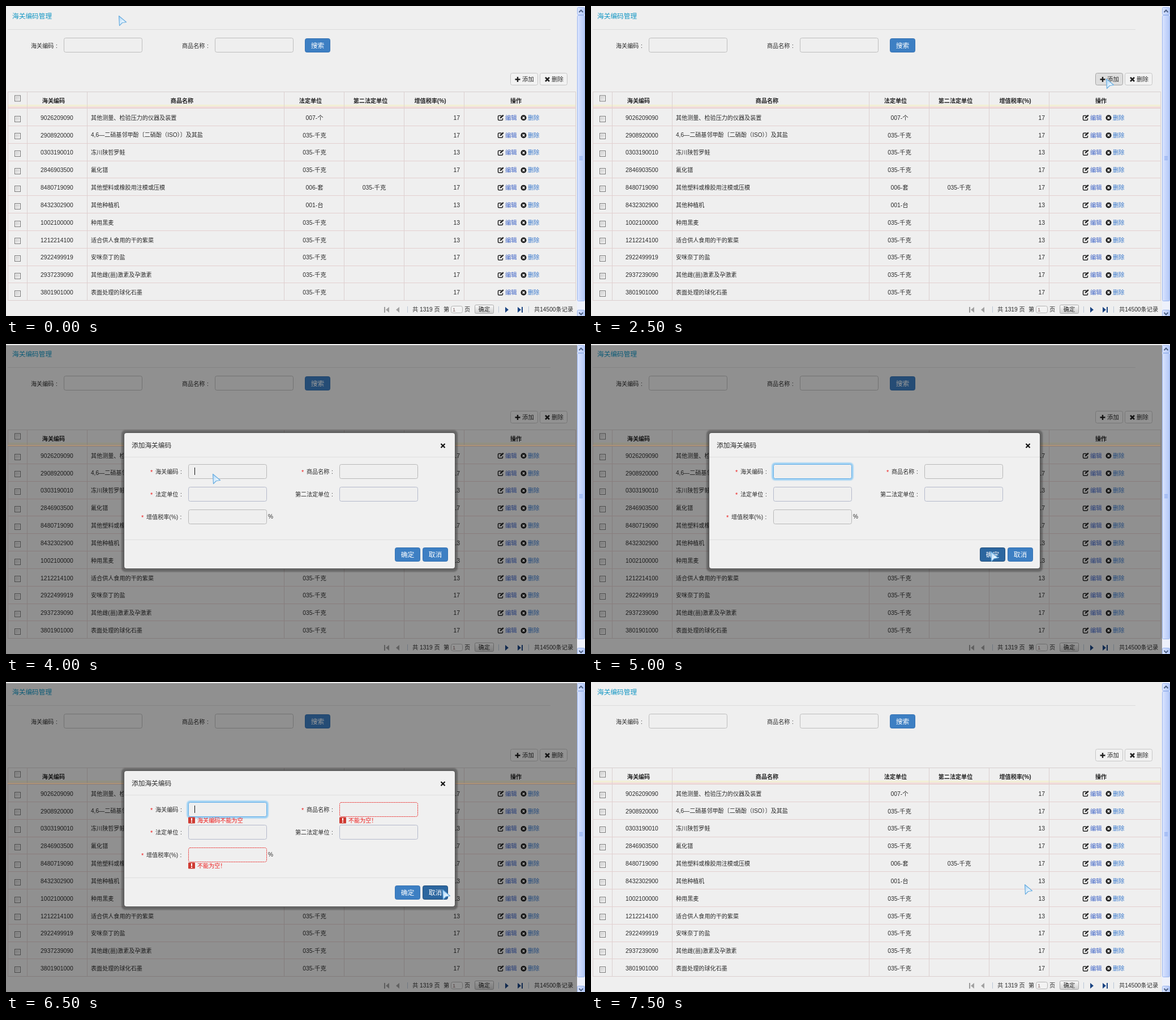
These frames come from a looping animation (1023x547 px, 8 s). An HTML page:

```html
<!DOCTYPE html>
<html lang="zh-CN">
<head>
<meta charset="utf-8">
<title>海关编码管理</title>
<style>
html, body { margin: 0; width: 100%; height: 100%; overflow: hidden; background: #efefef; }
svg { display: block; width: 1023px; height: 547px; }
text { font-family: "Liberation Sans", "Noto Sans CJK SC", "Noto Sans CJK", sans-serif; white-space: pre; }
</style>
</head>
<body>
<svg id="stage" viewBox="0 0 1023 547">
  <defs>
    <linearGradient id="thumb"><stop stop-color="#dce6ff"/><stop offset=".5" stop-color="#c6d5fb"/><stop offset="1" stop-color="#b3c8f6"/></linearGradient>
    <linearGradient id="grey" x2="0" y2="1"><stop stop-color="#fafafa"/><stop offset="1" stop-color="#cfcfcf"/></linearGradient>
    <linearGradient id="check" x2="1" y2="1"><stop stop-color="#cfcfcf"/><stop offset="1" stop-color="#ececec"/></linearGradient>
    <linearGradient id="arrow" x2="1" y2="1"><stop stop-color="#a9d2f5"/><stop offset=".55" stop-color="#e2f2fe"/><stop offset="1" stop-color="#ffffff"/></linearGradient>
    <filter id="soft" x="-10%" y="-10%" width="120%" height="120%"><feGaussianBlur stdDeviation="1.3"/></filter>
  </defs>
</svg>
<script>
const NS = 'http://www.w3.org/2000/svg';
const stage = document.getElementById('stage');
const BLUE = '#3d7fc3', INK = '#2b2b2b', RED = '#ee1c1c', PAPER = '#efefef';

function add(parent, tag, attrs) {
  const el = document.createElementNS(NS, tag);
  for (const key in attrs) el.setAttribute(key, attrs[key]);
  return parent.appendChild(el);
}
const group = parent => add(parent, 'g', {});
const rect = (g, x, y, width, height, fill, more) => add(g, 'rect', { x, y, width, height, fill, ...more });
const path = (g, d, more) => add(g, 'path', { d, ...more });
const line = (g, x1, y1, x2, y2, stroke) => add(g, 'line', { x1, y1, x2, y2, stroke });

// y is the vertical middle of the glyphs
function text(g, str, x, y, more = {}) {
  const size = more['font-size'] || 10.1;
  const el = add(g, 'text', { x, y: y + size * 0.36, fill: INK, 'font-size': size, ...more });
  el.textContent = str;
  return el;
}
function label(g, str, x, y, required) {
  if (required) text(g, '*', x - 9, y + 1, { fill: RED, 'font-size': 11 });
  add(text(g, str, x, y), 'tspan', { dx: 3.5 }).textContent = ':';
}
function box(g, x, y, w, h, fill, stroke, more) {
  return rect(g, x + .5, y + .5, w - 1, h - 1, fill, { stroke, rx: 3, ...more });
}
function blueButton(g, str, x, y) {
  const b = box(g, x, y, 45, 25, BLUE, '#3572b3');
  text(g, str, x + 22.5, y + 12.5, { fill: '#fff', 'font-size': 11.8, 'text-anchor': 'middle' });
  return b;
}

const page = group(stage);
rect(page, 0, 0, 1023, 547, PAPER);

function drawSearch(g) {
  text(g, '海关编码管理', 11, 18, { fill: '#1497c4', 'font-size': 11.7 });
  line(g, 3, 41.5, 962, 41.5, '#dcdcdc');
  label(g, '海关编码', 44, 70);
  label(g, '商品名称', 311, 70);
  box(g, 102, 56, 139, 26, PAPER, '#bdbdbd');
  box(g, 369, 56, 139, 26, PAPER, '#bdbdbd');
  blueButton(g, '搜索', 528, 57);
}

function drawTools(g) {
  const addBox = box(g, 891, 118, 49, 22, '#f2f2f2', '#c6c6c6');
  path(g, 'M899.5 129.5h9M904 125v9', { stroke: '#222', 'stroke-width': 2.4 });
  text(g, '添加', 912, 129.5, { 'font-size': 10.4 });
  box(g, 943, 118, 49, 22, '#f2f2f2', '#c6c6c6');
  path(g, 'M953 126l7 7M960 126l-7 7', { stroke: '#222', 'stroke-width': 2.6 });
  text(g, '删除', 964, 129.5, { 'font-size': 10.4 });
  return addBox;
}

const COLUMNS = [3, 37, 143, 491, 597, 703, 809, 1006];
const HEADS = [['海关编码', 84], ['商品名称', 311], ['法定单位', 538], ['第二法定单位', 644], ['增值税率(%)', 749.5], ['操作', 901]];
const KG = '035-千克', PITCH = 30.84;
const ROWS = [
  ['9026209090', '其他测量、检验压力的仪器及装置', '007-个', 17],
  ['2908920000', '4,6—二硝基邻甲酚〔二硝酚（ISO）〕及其盐', KG, 17],
  ['0303190010', '冻川陕哲罗鲑', KG, 13],
  ['2846903500', '氟化镨', KG, 17],
  ['8480719090', '其他塑料或橡胶用注模或压模', '006-套', 17, KG],
  ['8432302900', '其他种植机', '001-台', 13],
  ['1002100000', '种用黑麦', KG, 13],
  ['1212214100', '适合供人食用的干的紫菜', KG, 13],
  ['2922499919', '安咪奈丁的盐', KG, 17],
  ['2937239090', '其他雌(甾)激素及孕激素', KG, 17],
  ['3801901000', '表面处理的球化石墨', KG, 17]
];

function checkbox(g, y) {
  rect(g, 15.5, y - 5, 10, 10, '#f6f6f6', { stroke: '#777' });
  rect(g, 17, y - 3.5, 7, 7, 'url(#check)');
}

function drawTable(g) {
  rect(g, 3, 174, 1003, 3.5, '#f2efd6');
  rect(g, 3, 177.5, 1003, 3, '#f2dada');
  line(g, 3, 151.5, 1006, 151.5, '#d6cfcf');
  for (const x of COLUMNS) line(g, x + .5, 151, x + .5, 520, '#dbd0d0');
  checkbox(g, 163);
  for (const [str, x] of HEADS) text(g, str, x, 167, { 'font-weight': 'bold', 'text-anchor': 'middle', fill: '#222' });
  ROWS.forEach(([code, name, unit, rate, unit2], i) => {
    const y = 197 + i * PITCH, edge = Math.round(180 + i * PITCH) + .5;
    const mid = { 'text-anchor': 'middle', 'font-size': 10.4 };
    line(g, 3, edge, 1006, edge, '#e3cfcf');
    checkbox(g, Math.round(y + 1.5) + .5);
    text(g, code, 90, y, mid);
    text(g, name, 150, y);
    text(g, unit, 545, y, mid);
    if (unit2) text(g, unit2, 650.5, y, mid);
    text(g, rate, 802, y, { 'text-anchor': 'end', 'font-size': 10.4 });
    const ops = add(g, 'g', { transform: `translate(0 ${y})` });
    path(ops, 'M875.5 -3.5h-4.5q-1.500 0 -1.500 1.500v5q0 1.500 1.500 1.500h5q1.500 0 1.500 -1.500v-2', { fill: 'none', stroke: '#222', 'stroke-width': 1.5 });
    path(ops, 'M872.500 1.500l.7 -2.500l4.800 -4.300l1.600 1.700l-4.700 4.500z', { fill: '#222' });
    text(ops, '编辑', 882, 0, { fill: '#3c62c6', 'font-size': 10.3 });
    add(ops, 'circle', { cx: 914.5, cy: .3, r: 5, fill: '#222' });
    path(ops, 'M912.700 -1.500l3.600 3.600M916.300 -1.500l-3.600 3.600', { stroke: '#fff', 'stroke-width': 1.5 });
    text(ops, '删除', 922, 0, { fill: '#3677cc', 'font-size': 10.3 });
  });
  line(g, 3, 519.5, 1006, 519.5, '#dccfcf');
}

function drawPager(g) {
  const y = 535.5, t = { 'font-size': 10.2 };
  rect(g, 668, 531, 2, 10, '#9b9b9b');
  path(g, 'M677 531v10l-6 -5zM695 531v10l-6 -5z', { fill: '#a2a2a2' });
  path(g, 'M882 531v10l6 -5zM904 531v10l6 -5zM911 531h2v10h-2z', { fill: '#1c4583' });
  for (const x of [709.5, 870.5, 923.5]) line(g, x, 530, x, 541, '#b9c6d6');
  text(g, '共 1319 页', 718, y, t);
  text(g, '第', 773, y, t);
  box(g, 786, 529, 21, 13, '#f3f3f3', '#b5b5b5');
  text(g, '1', 789, y, { fill: '#866', 'font-size': 9.5 });
  text(g, '页', 810, y, t);
  box(g, 828, 527, 34, 16, 'url(#grey)', '#aaa', { rx: 2 });
  text(g, '确定', 845, y, { ...t, 'text-anchor': 'middle' });
  text(g, '共14500条记录', 933, y, t);
}

function drawScrollbar(g) {
  const edge = '#9db7ee';
  rect(g, 1009, 0, 14, 547, '#eef1fb');
  box(g, 1009, 2, 14, 14, 'url(#thumb)', edge, { rx: 2 });
  box(g, 1009, 16, 14, 505, 'url(#thumb)', edge, { rx: 2 });
  box(g, 1009, 536, 14, 15, 'url(#thumb)', edge, { rx: 2 });
  path(g, 'M1012.500 11l3.500 -3.500l3.500 3.500M1012.500 541l3.500 3.500l3.500 -3.500', { fill: 'none', stroke: '#4d6185', 'stroke-width': 2 });
  for (let y = 265; y < 272; y += 2) line(g, 1013, y + .5, 1019, y + .5, '#8caaf0');
}

const FIELD_TOPS = [212, 252, 292];
function field(g, x, row) {
  return box(g, x, FIELD_TOPS[row], 139, 26, PAPER, row === 1 ? '#b4b9cb' : '#b8b8b8');
}
function errorNote(g, str, x, y) {
  rect(g, x, y - 5.5, 12, 11, '#cf3a32', { rx: 1 });
  rect(g, x + 5, y - 4, 2, 5, '#fff');
  rect(g, x + 5, y + 2, 2, 2, '#fff');
  text(g, str, x + 16, y, { fill: RED });
}

function drawDialog(g) {
  rect(g, 0, 2, 1009, 545, '#000', { opacity: .4 });
  line(g, 3, 179, 1006, 179, '#c8a56c');
  rect(g, 204, 152, 594, 250, '#000', { rx: 7, opacity: .28, filter: 'url(#soft)' });
  rect(g, 208, 156, 586, 241, '#555', { rx: 5 });
  rect(g, 209, 157, 584, 239, '#f0f0f0', { rx: 4 });
  text(g, '添加海关编码', 222, 179, { 'font-size': 11.7 });
  path(g, 'M768.500 176l7 7M775.500 176l-7 7', { stroke: '#111', 'stroke-width': 2.2 });
  line(g, 209, 199.5, 793, 199.5, '#dedede');
  line(g, 209, 345.5, 793, 345.5, '#dedede');
  label(g, '海关编码', 264, 225, true);
  label(g, '商品名称', 531, 225, true);
  label(g, '法定单位', 264, 265, true);
  label(g, '第二法定单位', 511, 265);
  label(g, '增值税率(%)', 248, 305, true);
  text(g, '%', 463, 304.5);
  const glow = rect(g, 321, 211, 141, 28, 'none', { stroke: '#7cc4f5', 'stroke-width': 2.5, rx: 4, filter: 'url(#soft)' });
  const code = field(g, 322, 0), name = field(g, 589, 0);
  field(g, 322, 1);
  field(g, 589, 1);
  const rate = field(g, 322, 2);
  const caret = rect(g, 333, 218, 1, 13, '#111');
  const errors = group(g);
  errorNote(errors, '海关编码不能为空', 322, 244);
  errorNote(errors, '不能为空！', 589, 244);
  errorNote(errors, '不能为空！', 322, 324);
  const ok = blueButton(g, '确定', 687, 359), cancel = blueButton(g, '取消', 736, 359);
  return { glow, code, name, rate, caret, errors, ok, cancel };
}

drawSearch(page);
const addBox = drawTools(page);
drawTable(page);
drawPager(page);
drawScrollbar(page);
const dialog = group(stage);
const ui = drawDialog(dialog);
const cursor = group(stage);
path(cursor, 'M.5 .5L13.500 11.500L6.500 12.500L1.500 17.500Z', { fill: 'url(#arrow)', stroke: '#69addf', 'stroke-width': 1.2, 'stroke-linejoin': 'round' });

// One entry per half second: pointer position, and the parts lit at that time
const STEP = 500;
const STEPS = [
  [199, 17, ''], [462, 60, ''], [573, 69, ''], [813, 136, ''], [813, 136, ''],
  [910, 128, 'add'], [910, 128, 'add open'], [581, 246, 'add open'],
  [365, 229, 'open caret'], [692, 341, 'open caret focus'], [706, 366, 'open focus ok'],
  [605, 319, 'open caret focus errors'], [470, 262, 'open focus errors'],
  [771, 366, 'open caret focus errors cancel'], [768, 366, 'open focus errors cancel'],
  [766, 357, '']
];

const show = (el, on) => { el.style.display = on ? '' : 'none'; };
function paint(el, fill, stroke, dash = 'none') {
  el.setAttribute('fill', fill);
  el.setAttribute('stroke', stroke);
  el.setAttribute('stroke-dasharray', dash);
}
const paintButton = (el, hot) => hot ? paint(el, '#2c669f', '#204d7a') : paint(el, BLUE, '#3572b3');

function render(time) {
  const [x, y, parts] = STEPS[Math.floor(time / STEP) % STEPS.length];
  const has = part => parts.split(' ').includes(part);
  cursor.setAttribute('transform', `translate(${x} ${y})`);
  has('add') ? paint(addBox, '#dedede', '#a3a3a3') : paint(addBox, '#f2f2f2', '#c6c6c6');
  show(dialog, has('open'));
  show(ui.caret, has('caret'));
  show(ui.glow, has('focus'));
  show(ui.errors, has('errors'));
  paint(ui.code, PAPER, has('focus') ? '#66aee6' : '#b8b8b8');
  for (const f of [ui.name, ui.rate]) {
    has('errors') ? paint(f, PAPER, '#ea2b2b', '2 1') : paint(f, PAPER, '#b8b8b8');
  }
  paintButton(ui.ok, has('ok'));
  paintButton(ui.cancel, has('cancel'));
}

const start = performance.now();
function tick() {
  render(Math.max(0, performance.now() - start));
  requestAnimationFrame(tick);
}
tick();
</script>
</body>
</html>
```
